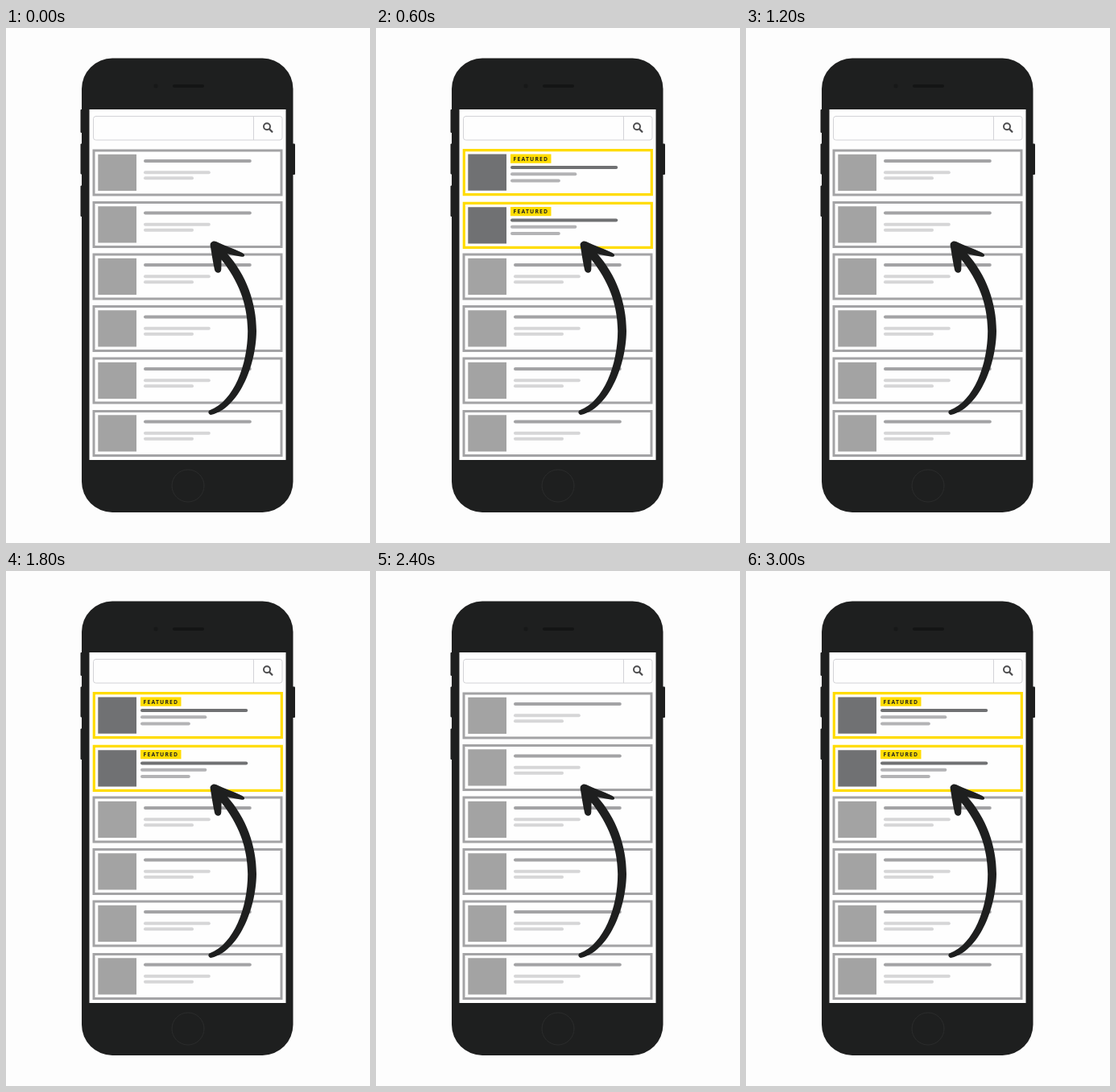
An HTML page with a canvas for the animation above (3600 ms loop, 452 px wide and 639 px high).

```html
<!DOCTYPE html>
<html lang="en">
<head>
<meta charset="utf-8">
<title>Featured listings</title>
<style>
  html, body { margin: 0; width: 100%; height: 100%; overflow: hidden; background: #fdfdfd; }
  canvas { display: block; }
</style>
</head>
<body>
<canvas id="stage" width="452" height="639"></canvas>
<script>
const ctx = document.getElementById('stage').getContext('2d');
const HOLD = 600;
const INK = '#1e1f1f';
const YELLOW = '#ffdc00';
const CARD_TOPS = [150.5, 215, 279.5, 344, 408.5, 474];

function box(x, y, w, h, color, radius = 0) {
  ctx.fillStyle = color;
  ctx.beginPath();
  ctx.roundRect(x, y, w, h, radius);
  ctx.fill();
}

function frame(x, y, w, h, color, width, radius = 0) {
  ctx.strokeStyle = color;
  ctx.lineWidth = width;
  ctx.beginPath();
  ctx.roundRect(x, y, w, h, radius);
  ctx.stroke();
}

function line(x1, y1, x2, y2, color, width, cap = 'round') {
  ctx.strokeStyle = color;
  ctx.lineWidth = width;
  ctx.lineCap = cap;
  ctx.beginPath();
  ctx.moveTo(x1, y1);
  ctx.lineTo(x2, y2);
  ctx.stroke();
}

function ring(x, y, r, color, width) {
  ctx.strokeStyle = color;
  ctx.lineWidth = width;
  ctx.beginPath();
  ctx.arc(x, y, r, 0, Math.PI * 2);
  ctx.stroke();
}

// A horizontal bar with round ends, centred on y.
function bar(left, right, y, color) {
  box(left, y - 2, right - left, 4, color, 2);
}

function drawPhone() {
  box(92.5, 101, 4, 29, INK, 1);
  box(92.5, 143.5, 4, 38, INK, 1);
  box(92.5, 195.5, 4, 38.5, INK, 1);
  box(354, 143.5, 5, 38.5, INK, 1);
  box(94, 37.5, 262.5, 563.5, INK, 38);
  box(207, 70, 39, 4, '#141515', 2);
  box(183.5, 69.5, 5, 5, '#171818', 2.5);
  ring(226, 568, 20, '#2b2c2c', 1);
  box(103.5, 101, 244, 435, '#fefefe');
}

function drawSearch() {
  frame(108.5, 109.5, 234.5, 29.5, '#d3d3d7', 1, 3);
  line(307.5, 110, 307.5, 139, '#d3d3d7', 1, 'butt');
  ring(324, 122.3, 4, '#4a4a4c', 1.9);
  line(327.4, 125.7, 330.4, 128.7, '#4a4a4c', 2.3);
}

function drawCard(top) {
  frame(109, top + 1.5, 233, 55, '#a3a3a5', 3);
  box(114.3, top + 6.3, 47.7, 45.2, '#a3a3a3');
  bar(171, 304.8, top + 14.5, '#a3a3a5');
  bar(171, 253.8, top + 28.7, '#d6d6d7');
  bar(171, 233, top + 35.8, '#d6d6d7');
}

function drawFeatured(top) {
  frame(109.3, top + 1.5, 233, 55, YELLOW, 3.2);
  box(114.3, top + 6.4, 47.7, 45.2, '#707173');
  box(167, top + 6.3, 50.5, 11.2, YELLOW);
  ctx.fillStyle = INK;
  ctx.font = 'bold 6.8px "Open Sans", sans-serif';
  ctx.letterSpacing = '1.2px';
  ctx.textBaseline = 'alphabetic';
  ctx.fillText('FEATURED', 170.6, top + 14.4);
  bar(167, 300.2, top + 22.8, '#707173');
  bar(167, 249.3, top + 31, '#b3b3b5');
  bar(167, 228.8, top + 39.3, '#b3b3b5');
}

function drawArrow() {
  ctx.fillStyle = INK;
  ctx.fill(new Path2D(`
    M 253 474.3
    C 283 463 300 418 300.2 376
    C 300 342 288 313 267.6 287.5
    L 267.3 299.5
    C 267 305.2 260.3 305.2 259 300
    C 256.8 290 255.4 280 253.7 270
    C 253 266 257.2 263.3 261 265
    C 271 269.8 282 273.6 293 278.8
    C 298 281.4 296.5 284.5 292.5 283.7
    C 287 282.8 281 281.7 275 280.3
    C 298 306 311 341 311 376
    C 310.5 421 288 472 255.5 479.8
    C 251 480.6 250.3 475.5 253 474.3 Z`));
}

function draw(now) {
  const featured = Math.floor(now / HOLD) % 2 === 1;
  ctx.fillStyle = '#fdfdfd';
  ctx.fillRect(0, 0, 452, 639);
  drawPhone();
  drawSearch();
  CARD_TOPS.forEach((top, i) => {
    if (featured && i < 2) drawFeatured(150.2 + i * 65.6);
    else drawCard(top);
  });
  drawArrow();
}

const start = performance.now();
function tick() {
  draw(performance.now() - start);
  requestAnimationFrame(tick);
}
tick();
</script>
</body>
</html>
```
